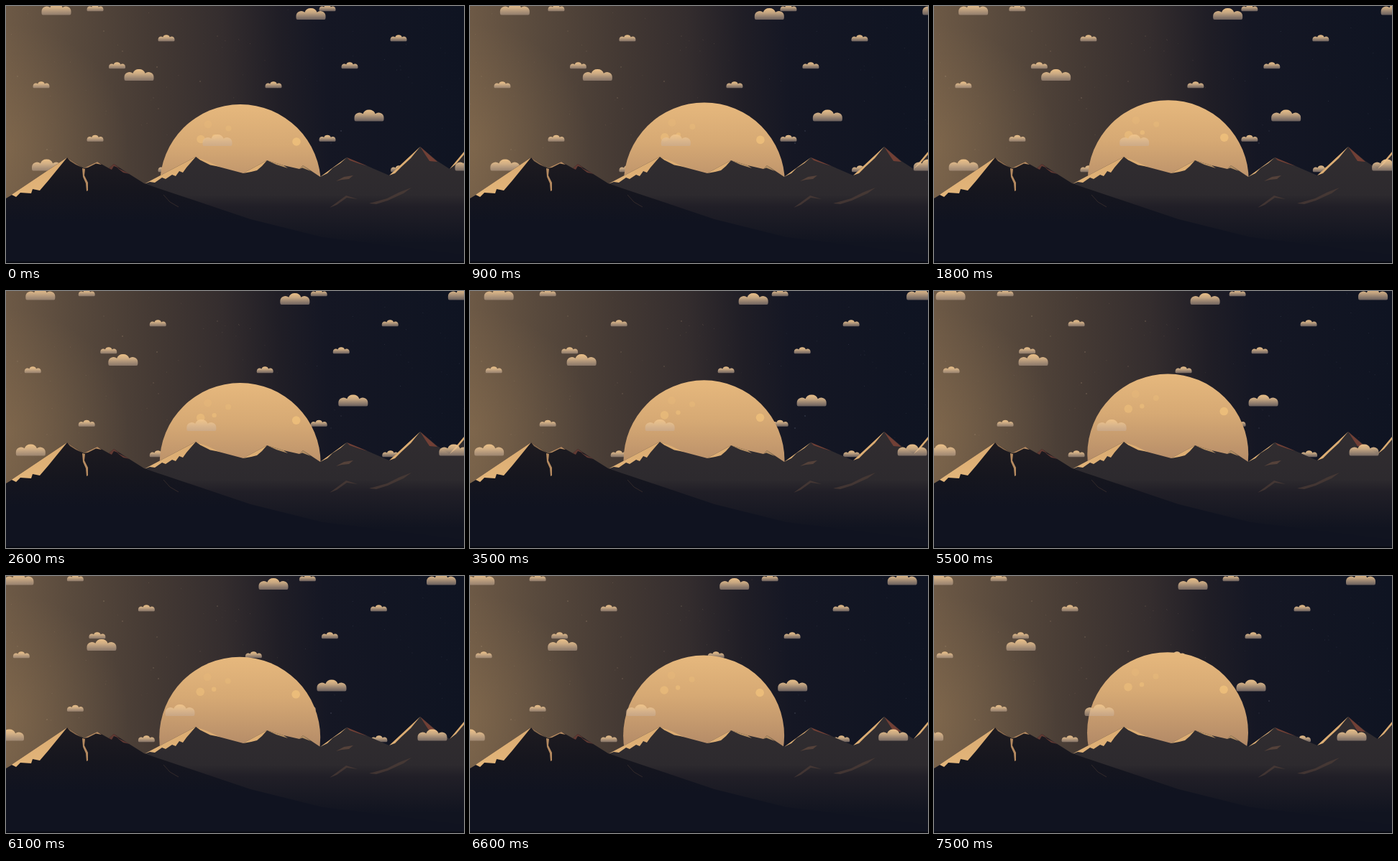
These frames come from a looping animation (637x358 px, 7.6 s). An HTML page:

```html
<!DOCTYPE html>
<html lang="en">
<head>
<meta charset="utf-8">
<title>Moonrise</title>
<style>
  html, body { margin: 0; width: 100%; height: 100%; overflow: hidden; background: #10131f; }
  svg { display: block; width: 100vw; height: 100vh; }
</style>
</head>
<body>
<svg viewBox="0 0 637 358" preserveAspectRatio="none">
  <defs>
    <linearGradient id="sky" gradientUnits="userSpaceOnUse" x1="0" y1="150" x2="637" y2="130">
      <stop offset="0" stop-color="#6e5a46"/>
      <stop offset=".15" stop-color="#594a3d"/>
      <stop offset=".32" stop-color="#453a34"/>
      <stop offset=".48" stop-color="#342d2e"/>
      <stop offset=".6" stop-color="#201e26"/>
      <stop offset=".7" stop-color="#151724"/>
      <stop offset="1" stop-color="#0f1422"/>
    </linearGradient>
    <radialGradient id="glow" gradientUnits="userSpaceOnUse" cx="0" cy="195" r="170">
      <stop offset="0" stop-color="#a08058" stop-opacity=".32"/>
      <stop offset="1" stop-color="#a08058" stop-opacity="0"/>
    </radialGradient>
    <linearGradient id="disc" x2="0" y2="1">
      <stop offset="0" stop-color="#e6b87d"/>
      <stop offset=".25" stop-color="#d6a974"/>
      <stop offset=".55" stop-color="#b58c68"/>
      <stop offset="1" stop-color="#86675a"/>
    </linearGradient>
    <linearGradient id="puff" x2="0" y2="1">
      <stop offset="0" stop-color="#f0c48a" stop-opacity=".97"/>
      <stop offset=".4" stop-color="#e2bd90" stop-opacity=".85"/>
      <stop offset="1" stop-color="#c8af9b" stop-opacity=".48"/>
    </linearGradient>
    <linearGradient id="far" gradientUnits="userSpaceOnUse" x1="0" y1="196" x2="0" y2="330">
      <stop offset="0" stop-color="#312d30"/>
      <stop offset=".5" stop-color="#2d2a2e"/>
      <stop offset=".62" stop-color="#211f27"/>
      <stop offset="1" stop-color="#111420"/>
    </linearGradient>
    <linearGradient id="near" gradientUnits="userSpaceOnUse" x1="0" y1="211" x2="0" y2="300">
      <stop offset="0" stop-color="#1e1b20"/>
      <stop offset=".5" stop-color="#16161e"/>
      <stop offset="1" stop-color="#101320"/>
    </linearGradient>
    <linearGradient id="lit" gradientUnits="userSpaceOnUse" x1="0" y1="200" x2="0" y2="268">
      <stop offset="0" stop-color="#d9a96f"/>
      <stop offset="1" stop-color="#e3b67b"/>
    </linearGradient>
    <path id="cloud" fill="url(#puff)" d="M-18.5 7.5Q-20.5 7.5-20.5 5V2.5A7.2 7 0 0 1-8.6-2.8A9 8 0 0 1 8.6-2.8A7.2 7 0 0 1 20.5 2.5V5Q20.5 7.5 18.5 7.5Z"/>
  </defs>

  <rect width="637" height="358" fill="url(#sky)"/>
  <rect width="200" height="358" fill="url(#glow)"/>
  <g id="stars"></g>
  <g id="back"></g>

  <g id="moon">
    <circle r="112" fill="url(#disc)"/>
    <g fill="#efbf7b">
      <circle cx="-45" cy="-84" r="5.5" opacity=".25"/>
      <circle cx="-16.5" cy="-78.5" r="4" opacity=".35"/>
      <circle cx="-55" cy="-63.5" r="5.8" opacity=".6"/>
      <circle cx="-36" cy="-67" r="3.2" opacity=".6"/>
      <circle cx="78" cy="-60" r="5.8" opacity=".85"/>
    </g>
  </g>

  <path fill="url(#far)" d="M180 254L192 248L264 210L296 224L330 233L363 215L386 222L408 227L413 222L437 238L474 211L503 223L533 236L576 196L600 216L617 227L637 203V358H180Z"/>
  <g fill="url(#lit)">
    <path d="M192 248L264 210L251 225L246 232L241 230L236 237L231 235L222 241L217 239L207 246L200 245Z"/>
    <path d="M264 210L280 216L297 224L284 221.500L270 214.500Z"/>
    <path d="M330 233L363 215L356 223L349 229L341 231Z"/>
    <path d="M363 215L386 222L392 226L376 221Z" opacity=".8"/>
    <path d="M408 227L413 222L424 230L412 225.500Z" opacity=".75"/>
    <path d="M437 238L474 211L465 219L454 226L447 233Z"/>
    <path d="M533 236L576 196L563 212L550 224L541 233Z"/>
    <path d="M617 227L637 203V207L626 220Z"/>
  </g>
  <g fill="#713f35">
    <path d="M474 211L503 223L491 219.500L478 215Z"/>
    <path d="M576 196L600 217L589 216L583 207Z"/>
  </g>
  <g fill="#55423a">
    <path d="M459 244L470 238L483 236L477 241L467 242Z"/>
    <path d="M450 281L473 264L489 269L474 267L460 277Z" opacity=".6"/>
    <path d="M505 275L530 268L548 259L564 253L553 261L531 271L515 276Z" opacity=".6"/>
  </g>

  <g id="front"></g>

  <path fill="url(#near)" d="M0 268L85 211L108 226L127 217L143 226L150 220L165 230L192 247L212 254L260 270L340 297L440 322L637 346V358H0Z"/>
  <path fill="url(#lit)" d="M0 268L85 211L72 227L59 243L47 257L37 255L35 261L20 260L14 266L8 263Z"/>
  <g fill="#b58a60">
    <path d="M85 211L106 225L97 221L89 216Z" opacity=".7"/>
    <path d="M108 226L127 217L133 221L125 219.500L114 225Z"/>
    <path d="M106 226L110 227L109 236L114 246L114 257L112 258L111 247L107 238Z"/>
  </g>
  <g fill="#613a33">
    <path d="M143 226L150 220L158 226L150 223L147 228Z"/>
    <path d="M154 225L172 234L163 232Z"/>
  </g>
  <path d="M219 263L228 273L240 280" fill="none" stroke="#332a2b" stroke-width="1"/>
  <rect y="356" width="637" height="2" fill="#070911"/>
</svg>
<script>
const LOOP = 7600, STEP = 100;
const byId = id => document.getElementById(id);

function add(parent, tag, attrs) {
  const el = document.createElementNS("http://www.w3.org/2000/svg", tag);
  for (const key in attrs) el.setAttribute(key, attrs[key]);
  parent.appendChild(el);
  return el;
}

// Cloud layers: start positions, scale and drift in px per second
const layers = [
  { group: byId("front"), scale: 1, speed: 8.53,
    at: [[70, 5], [424, 11.5], [185, 96.5], [294, 187.5], [505, 153], [56.5, 222], [657.5, 5], [645, 222]] },
  { group: byId("back"), scale: 0.56, speed: 4.53,
    at: [[124, 3], [447, 3], [223, 45], [546, 45], [154.5, 83], [478, 83],
         [49, 110], [372, 110], [124, 184.5], [447, 184.5], [223, 227], [546.5, 227]] }
];
for (const { group, scale, at } of layers)
  for (const [x, y] of at)
    add(group, "use", { href: "#cloud", transform: `translate(${x} ${y}) scale(${scale})` });

let seed = 11;
const random = () => (seed = (seed * 16807) % 2147483647) / 2147483647;

const bright = [[136, 35], [162, 63], [210, 85], [294, 42], [205, 128], [16, 98], [212, 143], [466, 174], [452, 191], [57, 200], [270, 105]];
const faint = Array.from({ length: 70 }, () => [random() * 637, random() * 205]);
const stars = [...bright, ...faint].map(([x, y], i) => {
  const isBright = i < bright.length;
  const el = add(byId("stars"), "circle", { cx: x, cy: y, r: isBright ? 0.7 : 0.5, fill: x > 400 ? "#8c93a8" : "#c9ac8b" });
  return { el, level: isBright ? 0.5 : 0.25, phase: random() * 6.28, turns: 1 + i % 3 };
});

function draw(ms) {
  const p = ms / 7500;
  for (const { group, speed } of layers)
    group.setAttribute("transform", `translate(${-speed * ms / 1000} 0)`);
  byId("moon").setAttribute("transform", `translate(${326 - p} ${249 - 30.8 * p ** 1.17})`);
  for (const s of stars)
    s.el.setAttribute("opacity", s.level * (0.7 + 0.3 * Math.sin(s.phase + s.turns * 6.283 * ms / LOOP)));
}

const start = performance.now();
function tick() {
  const ms = (performance.now() - start) % LOOP;
  draw(Math.floor(ms / STEP) * STEP);
  requestAnimationFrame(tick);
}
tick();
</script>
</body>
</html>
```
